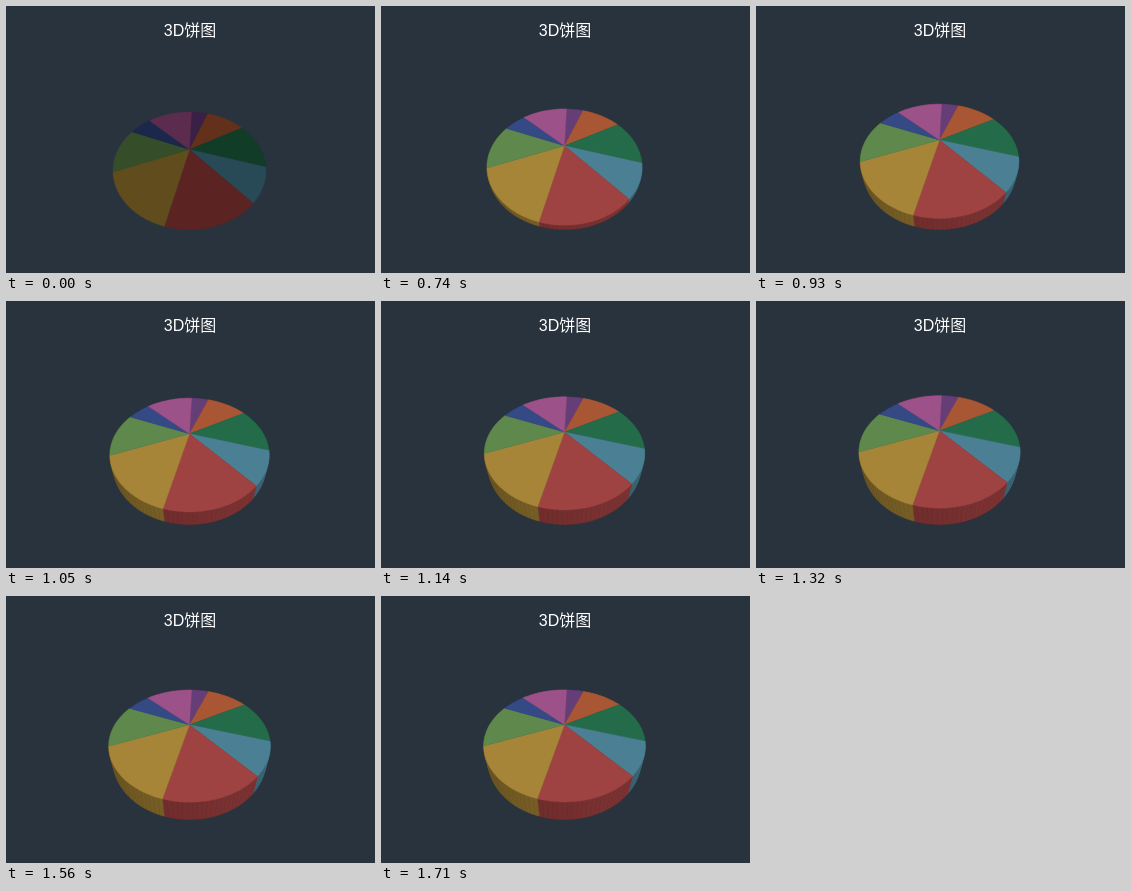
Animation, 369 px wide and 267 px high, one loop 2170 ms. Source, as an HTML page with a canvas:

```html
<!DOCTYPE html>
<html lang="zh">
<head>
<meta charset="utf-8">
<title>3D饼图</title>
<style>
  html, body { margin: 0; width: 100%; height: 100%; overflow: hidden; background: #29333d; }
  canvas { display: block; }
</style>
</head>
<body>
<canvas id="stage" width="369" height="267"></canvas>
<script>
const ctx = document.getElementById('stage').getContext('2d');
const LOOP = 2170;
const RISE_START = 740;
const RISE_END = 1710;
const TICK = 63;
const FIRST_ANGLE = 2.2;

// Chart data, clockwise from the back.
const data = [
  { value: 18, color: '#9a60b4' },
  { value: 40, color: '#fc8452' },
  { value: 47.5, color: '#3ba272' },
  { value: 32, color: '#73c0de' },
  { value: 53.5, color: '#ee6666' },
  { value: 54.5, color: '#fac858' },
  { value: 45.5, color: '#91cc75' },
  { value: 22, color: '#5470c6' },
  { value: 47, color: '#ea7ccc' }
];
const total = data.reduce((sum, d) => sum + d.value, 0);

const rad = degrees => degrees * Math.PI / 180;

function shade(hex, light) {
  const channel = i => parseInt(hex.slice(i, i + 2), 16);
  const lit = [1, 3, 5].map(i => Math.max(0, Math.round((channel(i) + 14) * light - 14)));
  return `rgb(${lit})`;
}

// Perspective view of a point on a disc of radius 1, lifted by height 0..1.
function project(angle, radius, height) {
  const side = radius * Math.sin(rad(angle));
  const near = -radius * Math.cos(rad(angle));
  const depth = 1 - 0.362 * near - 0.048 * height;
  return [
    183.5 + 71.3 * side / depth,
    143.5 + (51.1 * near - 14.4 * height) / depth
  ];
}

function fillShape(points, color) {
  ctx.beginPath();
  points.forEach(p => ctx.lineTo(...p));
  ctx.closePath();
  ctx.fillStyle = ctx.strokeStyle = color;
  ctx.lineWidth = 0.4;
  ctx.fill();
  ctx.stroke();
}

// Angles from one end of a slice to the other, about 2.5 degrees apart.
function arcAngles(from, to) {
  const count = Math.ceil((to - from) / 2.5);
  return Array.from({ length: count + 1 }, (_, i) => from + (to - from) * i / count);
}

function drawWall(from, to, color, height) {
  const angles = arcAngles(from, to);
  for (let i = 1; i < angles.length; i++) {
    const a = angles[i - 1], b = angles[i];
    const light = 0.517 + 0.065 * Math.sin(rad((a + b) / 2));
    fillShape([
      project(a, 1, 0), project(b, 1, 0),
      project(b, 1, height), project(a, 1, height)
    ], shade(color, light));
  }
}

function drawTop(from, to, color, height, light) {
  const rim = arcAngles(from, to).map(a => project(a, 1, height));
  fillShape([project(0, 0, height), ...rim], shade(color, light));
}

function eachSlice(drawSlice) {
  let from = FIRST_ANGLE;
  for (const { value, color } of data) {
    const to = from + 360 * value / total;
    drawSlice(from, to, color);
    from = to;
  }
}

function riseHeight(time) {
  const elapsed = Math.min(time, RISE_END) - RISE_START;
  const stepped = Math.floor(elapsed / TICK) * TICK;
  return 1 - 0.75 * Math.exp(-0.0039 * stepped);
}

function draw(time) {
  const raised = time >= RISE_START;
  const height = raised ? riseHeight(time) : 0;

  ctx.fillStyle = '#29333d';
  ctx.fillRect(0, 0, 369, 267);
  if (raised) eachSlice((from, to, color) => drawWall(from, to, color, height));
  eachSlice((from, to, color) => drawTop(from, to, color, height, raised ? 0.687 : 0.422));

  ctx.fillStyle = '#fff';
  ctx.font = '16px "Liberation Sans", "Noto Sans CJK SC", "Noto Sans CJK", sans-serif';
  ctx.textAlign = 'center';
  ctx.fillText('3D饼图', 184, 30);
}

const start = performance.now();
function frame() {
  draw((performance.now() - start) % LOOP);
  requestAnimationFrame(frame);
}
frame();
</script>
</body>
</html>
```
